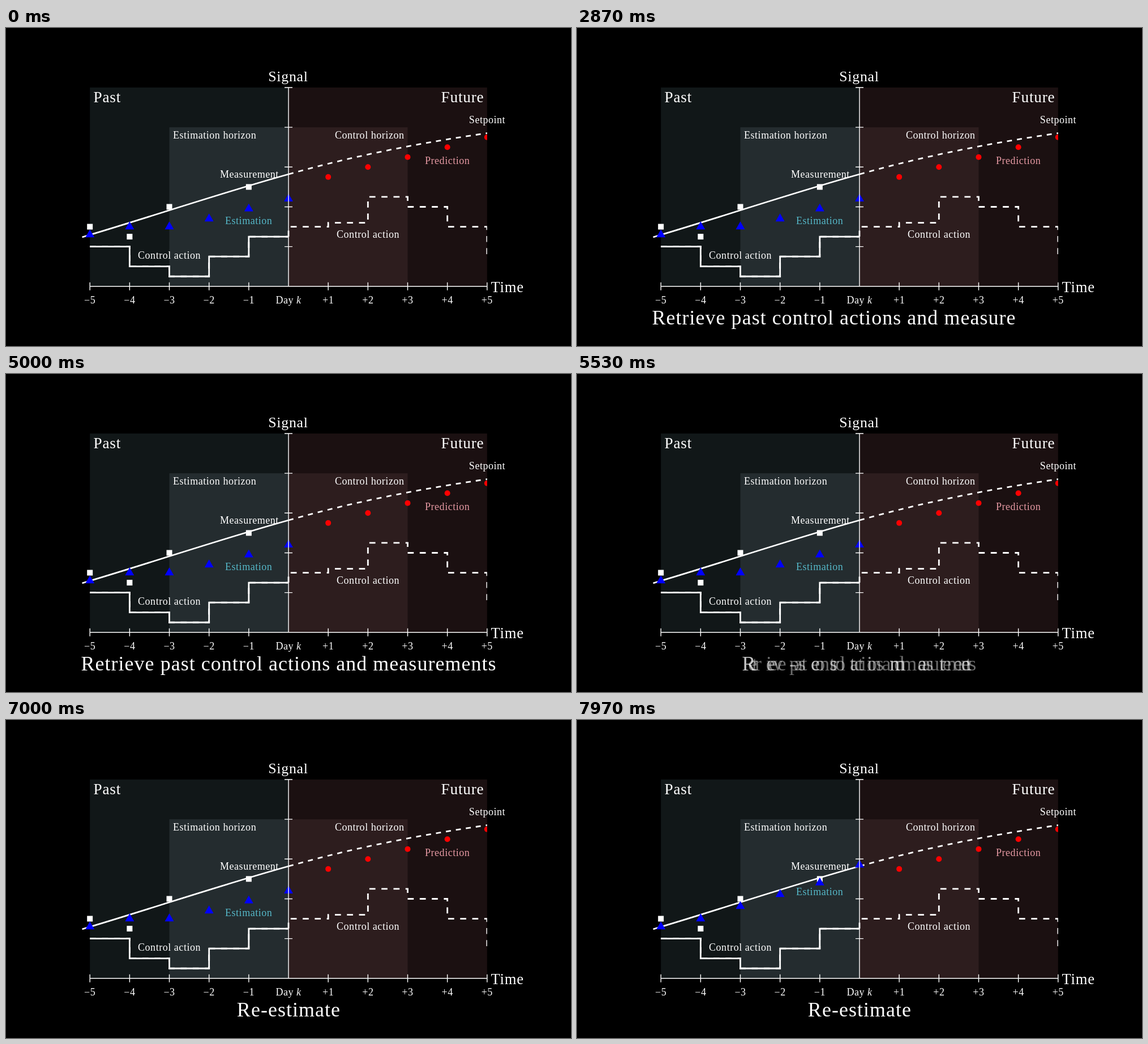
Animation, 998 px wide and 561 px high, one loop 8 s. Source, as an HTML page:

```html
<!DOCTYPE html>
<html lang="en">
<head>
<meta charset="utf-8">
<title>Receding horizon control</title>
<style>
html, body { margin: 0; width: 100%; height: 100%; overflow: hidden; background: #000; }
svg { display: block; width: 998px; height: 561px; }
text { font-family: "Liberation Serif", "Times New Roman", serif; letter-spacing: .03em; fill: #fff; white-space: pre; }
</style>
</head>
<body>
<svg id="stage" viewBox="0 0 998 561"></svg>
<script>
const LOOP = 8000;
const OX = 499, OY = 455.8, UNIT = 70.16;
const stage = document.getElementById('stage');

function el(tag, attrs, parent = stage) {
  const node = document.createElementNS('http://www.w3.org/2000/svg', tag);
  for (const key in attrs) node.setAttribute(key, attrs[key]);
  parent.appendChild(node);
  return node;
}
const px = day => OX + day * UNIT;
const py = value => OY - value * UNIT;
const rect = (x, y, x2, y2, fill, parent) =>
  el('rect', { x, y, width: x2 - x, height: y2 - y, fill }, parent);
const line = (d, width, dash = 'none', parent = stage) =>
  el('path', { d, fill: 'none', stroke: '#fff', 'stroke-width': width, 'stroke-dasharray': dash }, parent);
function label(str, x, y, size = 18, anchor = 'start', fill = '#fff', parent = stage) {
  const node = el('text', { x, y, 'font-size': size, 'text-anchor': anchor, style: `fill:${fill}` }, parent);
  node.textContent = str;
  return node;
}

// Regions
rect(px(-5), py(5), OX, OY, '#111718');
rect(OX, py(5), px(5), OY, '#1b1011');
rect(px(-3), py(4), OX, OY, '#242c2f');
rect(OX, py(4), px(3), OY, '#2d1d1e');

// Signals, cut off at the right edge of the plot
const clip = el('clipPath', { id: 'plot' });
rect(0, 0, px(5), 561, '#fff', clip);
const plot = el('g', { 'clip-path': 'url(#plot)' });

function steps(from, levels, start) {
  let d = `M${px(from)} ${py(start)}`;
  levels.forEach((value, i) => { d += `V${py(value)}H${px(from + i + 1)}`; });
  return d;
}
const SIGNAL = 2.8, CONTROL_DASH = '10.7 10.6';
line('M134.5 369C250 335 380 291 499 258', SIGNAL, 'none', plot);
line('M499 258C616 225 733 202.5 850 185.5', SIGNAL, '8.9 8.9', plot);
const pastControl = steps(-5, [1, .5, .25, .75, 1.25], 1);
line(pastControl, SIGNAL, 'none', plot);
line(pastControl, SIGNAL, CONTROL_DASH, plot);
line(steps(0, [1.5, 1.6, 2.25, 2, 1.5], 1.25) + 'V405', SIGNAL, CONTROL_DASH, plot);

[[-5, 1.5], [-4, 1.25], [-3, 2], [-1, 2.5]].forEach(([day, value]) =>
  rect(px(day) - 5, py(value) - 5, px(day) + 5, py(value) + 5, '#fff', plot));
for (let day = 1; day <= 5; day++) {
  el('circle', { cx: px(day), cy: py(2.5 + day / 4), r: 5, fill: '#ff0000' }, plot);
}

// Value of each estimate and how far it rises when re-estimated
const R = 9.2, HALF = R * Math.sqrt(3) / 2;
const estimates = [[1.3, 0], [1.5, 0], [1.5, 22], [1.7, 29], [1.95, 32], [2.2, 46]]
  .map(([value, rise], i) => ({
    rise,
    node: el('path', {
      d: `M${px(i - 5)} ${py(value) - R}l${HALF} ${1.5 * R}h${-2 * HALF}z`,
      fill: '#0000ff'
    }, plot)
  }));

// Axes
let axes = `M${px(-5)} ${OY}H${px(5)}M${OX} ${OY}V${py(5)}`;
for (let i = -5; i <= 5; i++) if (i) axes += `M${px(i)} ${OY - 7}v14`;
for (let i = 1; i <= 5; i++) axes += `M${OX - 7} ${py(i)}h14`;
line(axes, 1.4);
for (let i = -5; i <= 5; i++) {
  if (i) label((i < 0 ? '−' : '+') + Math.abs(i), px(i), 486, 18, 'middle');
}
const today = label('Day ', OX, 486, 18, 'middle');
el('tspan', { 'font-style': 'italic' }, today).textContent = 'k';

// Labels
label('Signal', 498.5, 93.5, 25.8, 'middle');
label('Time', 856.5, 466, 26.6);
label('Past', 154.5, 130.5, 27.2);
label('Future', 844.5, 130.5, 27.2, 'end');
label('Estimation horizon', 295, 195);
label('Control horizon', 703.5, 195, 18, 'end');
label('Setpoint', 850, 168, 18, 'middle');
label('Measurement', 378, 264);
label('Control action', 233, 407);
label('Control action', 584, 370);
label('Prediction', 740, 239.5, 18, 'start', '#e498a2');
estimates.push({ rise: 37, node: label('Estimation', 387, 346, 18, 'start', '#55b8c8') });

// Captions
const CAP_Y = 522.5, CAP_SIZE = 35.9;
const caption = str => label(str, 499.5, CAP_Y, CAP_SIZE, 'middle');
const first = caption('Retrieve past control actions and measurements');
const second = caption('Re-estimate');

function glyphs(node) {
  return [...node.textContent].map((char, i) => ({
    char,
    x: node.getStartPositionOfChar(i).x,
    end: node.getEndPositionOfChar(i).x
  })).filter(g => g.char !== ' ');
}
const src = glyphs(first), dst = glyphs(second);

const wipe = rect(0, 480, 998, 561, '#fff', el('clipPath', { id: 'wipe' }));
first.setAttribute('clip-path', 'url(#wipe)');

// Every old letter travels to a new one; the first of each group turns into it
const morph = el('g', {});
const target = k => Math.floor(k * dst.length / src.length);
const movers = src.map((from, k) => {
  const to = dst[target(k)];
  const lead = k === 0 || target(k) !== target(k - 1);
  const make = char => label(char, 0, CAP_Y, CAP_SIZE, 'start', '#fff', morph);
  return { from, to, old: make(from.char), fresh: lead ? make(to.char) : null };
});

// Passing outlines around labels
const flashes = [
  { start: 3000, box: [371, 245, 487, 271] },
  { start: 3000, box: [226, 388, 350, 414] },
  { start: 6000, box: [380, 326.3, 477, 353.5] }
];
flashes.forEach(f => { f.node = line('', SIGNAL); });

const clamp = v => Math.min(1, Math.max(0, v));
const sigmoid = v => 1 / (1 + Math.exp(-v));
function smooth(v) {
  const edge = sigmoid(-5);
  return clamp((sigmoid(10 * (clamp(v) - .5)) - edge) / (1 - 2 * edge));
}
const mix = (a, b, s) => a + (b - a) * s;
const show = (node, on) => node.setAttribute('visibility', on ? 'visible' : 'hidden');

function flashPath([l, t, r, b], alpha) {
  const corners = [[r, t], [l, t], [l, b], [r, b], [r, t]];
  const at = u => {
    const i = Math.min(3, Math.floor(u)), p = corners[i], q = corners[i + 1];
    return [mix(p[0], q[0], u - i), mix(p[1], q[1], u - i)];
  };
  const head = 1.3 * smooth(alpha);
  const lo = 4 * clamp(head - .3), hi = 4 * clamp(head);
  if (hi - lo < 1e-4) return '';
  const pts = [at(lo)];
  for (let i = Math.floor(lo) + 1; i < hi; i++) pts.push(corners[i]);
  pts.push(at(hi));
  return 'M' + pts.join('L');
}

function draw(t) {
  show(first, t >= 2000 && t <= 5000);
  show(morph, t > 5000 && t < 6000);
  show(second, t >= 6000);

  // Letters are drawn one after another
  const count = clamp((t - 2000) / 1000) * src.length;
  const i = Math.min(src.length - 1, Math.floor(count));
  wipe.setAttribute('width', count >= src.length ? 998 : mix(src[i].x, src[i].end, smooth(count - i)));

  const s = smooth((t - 5000) / 1000);
  for (const m of movers) {
    const x = mix(m.from.x, m.to.x, s);
    m.old.setAttribute('x', x);
    m.old.setAttribute('opacity', 1 - s);
    if (m.fresh) {
      m.fresh.setAttribute('x', x);
      m.fresh.setAttribute('opacity', s);
    }
  }

  for (const f of flashes) {
    const a = (t - f.start) / 1000;
    f.node.setAttribute('d', a > 0 && a < 1 ? flashPath(f.box, a) : '');
  }

  const up = smooth((t - 7000) / 1000);
  for (const e of estimates) e.node.setAttribute('transform', `translate(0 ${-e.rise * up})`);
}

const begin = performance.now();
function tick() {
  draw((performance.now() - begin) % LOOP);
  requestAnimationFrame(tick);
}
tick();
</script>
</body>
</html>
```
